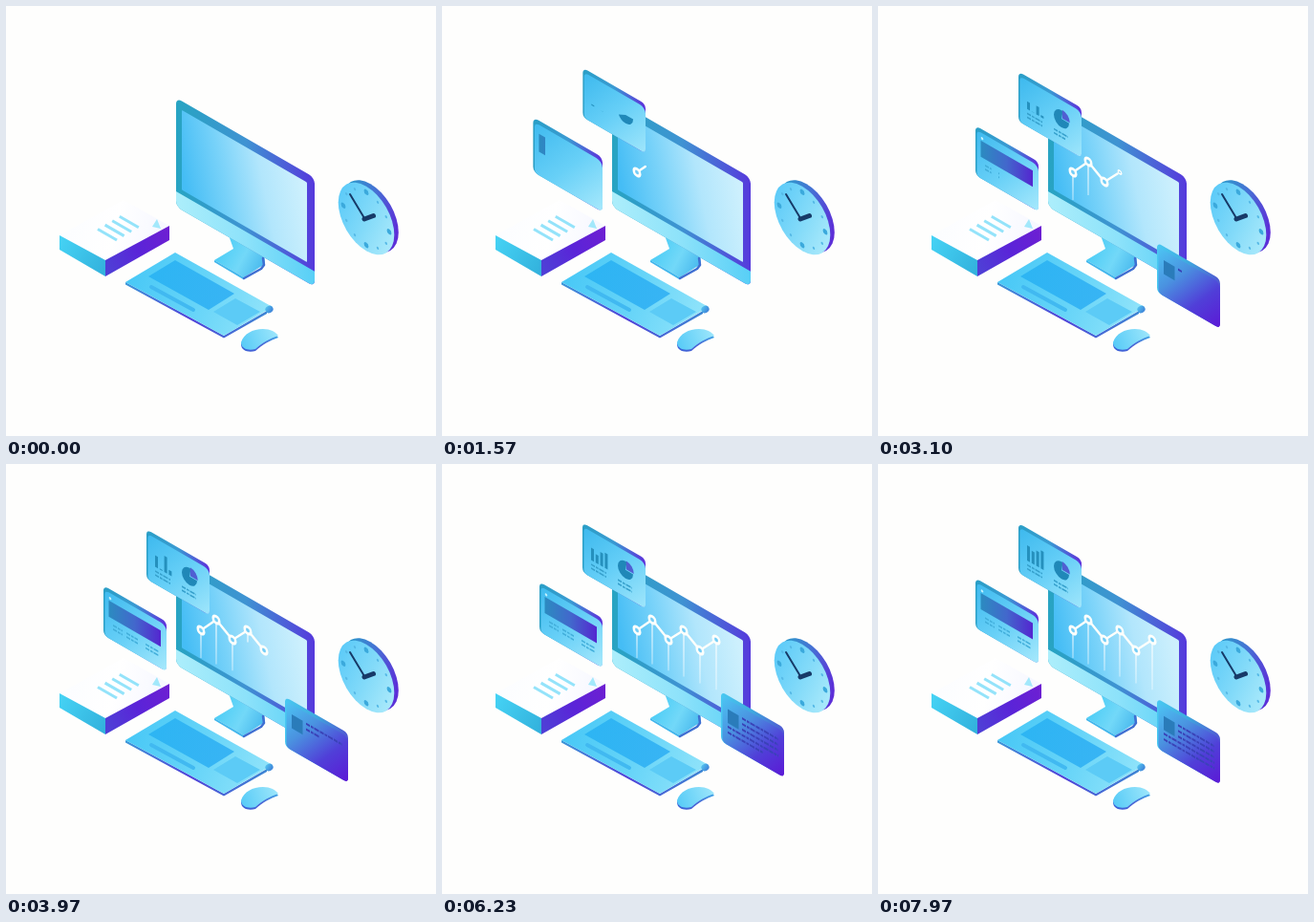
Write an HTML page with a canvas that moves like this. It is 450 px wide and 450 px high and loops after 8000 ms.

```html
<!DOCTYPE html>
<html lang="en">
<head>
<meta charset="utf-8">
<title>Isometric workspace</title>
<style>
  html, body { margin: 0; width: 100%; height: 100%; overflow: hidden; background: #fefefd; }
  canvas { display: block; width: 450px; height: 450px; }
</style>
</head>
<body>
<canvas id="stage"></canvas>
<script>
const LOOP = 8000, SLOPE = 0.577, CARD_W = 66, CARD_H = 52;
const canvas = document.getElementById('stage');
const ctx = canvas.getContext('2d');
const ratio = window.devicePixelRatio || 1;
canvas.width = canvas.height = 450 * ratio;

const clamp = v => Math.max(0, Math.min(1, v));
const progress = (t, start, length) => clamp((t - start) / length);
const ease = p => (1 - Math.cos(Math.PI * p)) / 2;
const spring = p => p <= 0 ? 0 : 1 - Math.exp(-5 * p) * Math.cos(4 * Math.PI * p);

// Period shared by the floating cards; peak is the lowest point.
const float = (t, mid, amp, peak) => mid + amp * Math.cos((t - peak) / 7200 * 2 * Math.PI);

function track(t, times, values, curve = p => p) {
  if (t <= times[0]) return values[0];
  for (let i = 1; i < times.length; i++) {
    if (t < times[i]) {
      const p = (t - times[i - 1]) / (times[i] - times[i - 1]);
      return values[i - 1] + (values[i] - values[i - 1]) * curve(p);
    }
  }
  return values[values.length - 1];
}

function gradient(x0, y0, x1, y1, ...colors) {
  const g = ctx.createLinearGradient(x0, y0, x1, y1);
  colors.forEach((c, i) => g.addColorStop(i / (colors.length - 1), c));
  return g;
}

function poly(points, fill) {
  ctx.beginPath();
  points.forEach(([x, y]) => ctx.lineTo(x, y));
  ctx.closePath();
  ctx.fillStyle = fill;
  ctx.fill();
}

function line(points, color, width, cap = 'round') {
  ctx.beginPath();
  points.forEach(([x, y]) => ctx.lineTo(x, y));
  ctx.strokeStyle = color;
  ctx.lineWidth = width;
  ctx.lineCap = cap;
  ctx.lineJoin = 'round';
  ctx.stroke();
}

function box(x, y, w, h, r, fill) {
  ctx.beginPath();
  ctx.roundRect(x, y, w, h, r);
  ctx.fillStyle = fill;
  ctx.fill();
}

function disc(x, y, r, fill) {
  ctx.beginPath();
  ctx.arc(x, y, r, 0, 2 * Math.PI);
  ctx.fillStyle = fill;
  ctx.fill();
}

// Draws in the wall plane that runs down to the right.
function wall(x, y, draw, sx = 1, sy = 1) {
  ctx.save();
  ctx.transform(sx, SLOPE * sx, 0, sy, x, y);
  draw();
  ctx.restore();
}

function book() {
  poly([[56, 240], [123, 203], [171, 230], [104, 266]], gradient(70, 220, 160, 240, '#fcfdff', '#ffffff', '#f7f8ff'));
  poly([[56, 240], [104, 266], [104, 283], [56, 255]], gradient(56, 245, 104, 275, '#45d2f4', '#33b2dd'));
  poly([[104, 266], [171, 230], [171, 245], [104, 283]], gradient(104, 270, 171, 238, '#4f3fd6', '#5a24d8', '#6d1fd2'));
  for (let i = 0; i < 4; i++) {
    const x = 96 + i * 7.6, y = 233.5 - i * 4.4;
    line([[x, y], [x + 20, y + 11.5]], '#94e3fa', 3, 'butt');
  }
  poly([[153, 231], [158, 223], [162, 233]], '#a3e8fb');
}

function keyboard() {
  poly([[125, 289], [228, 345], [273, 319], [273, 322], [228, 347.5], [125, 291.5]], gradient(125, 290, 270, 330, '#3b96d8', '#5040d8', '#3d86d4'));
  poly([[125, 289], [177, 258], [279, 315], [228, 345]], gradient(130, 275, 275, 330, '#48c8f6', '#66d4f8', '#92e4fa'));
  poly([[149, 283], [177, 266], [239, 301], [212, 318]], gradient(150, 280, 238, 306, '#2db5f3', '#38b4f4'));
  line([[152, 294], [196, 318]], '#41b9f1', 4);
  poly([[217, 320], [240, 306], [266, 320], [242, 334]], '#5ccbf6');
  ctx.beginPath();
  ctx.ellipse(275.5, 317.5, 4.2, 3.6, -0.5, 0, 2 * Math.PI);
  ctx.fillStyle = gradient(271, 315, 280, 321, '#55c8f2', '#3a74d2');
  ctx.fill();
}

function mouse() {
  const shape = dy => {
    ctx.beginPath();
    ctx.moveTo(246, 352 + dy);
    ctx.bezierCurveTo(249, 343 + dy, 258, 338 + dy, 269, 338 + dy);
    ctx.bezierCurveTo(277, 338 + dy, 282, 341 + dy, 285, 345 + dy);
    ctx.bezierCurveTo(276, 348 + dy, 269, 352 + dy, 261, 359 + dy);
    ctx.bezierCurveTo(254, 361 + dy, 246, 359 + dy, 246, 352 + dy);
  };
  shape(2);
  ctx.fillStyle = gradient(246, 355, 285, 345, '#3a62d8', '#4a62d4', '#3fa6e6');
  ctx.fill();
  shape(0);
  ctx.fillStyle = gradient(248, 355, 284, 342, '#5accf7', '#9ce6fb');
  ctx.fill();
}

function stand() {
  poly([[218, 266], [238, 254], [233, 240], [270, 257], [271, 270], [249, 284]], gradient(222, 255, 270, 280, '#4ccdf6', '#72d8f8', '#42b4ec'));
  poly([[218, 266], [249, 284], [249, 286.5], [218, 268]], '#41b6ec');
  line([[249, 285], [267, 275], [270, 271], [269, 264]], '#3f6fd2', 2.5);
}

function monitor() {
  wall(178, 96, () => {
    box(0, 0, 145, 114, 6, gradient(0, 0, 145, 0, '#27a4c2', '#3f93d2', '#5639dc'));
    box(0, 98, 145, 16, [0, 0, 6, 6], gradient(0, 0, 145, 0, '#aceefb', '#8de2fa', '#58cff6'));
    box(6, 9.5, 131, 83.5, 1, gradient(6, 70, 138, 40, '#45bdf5', '#78d2f9', '#b2e6fc', '#cdf0fd'));
  });
}

function clock() {
  const R = 29.3, stretch = 1.155;
  wall(381.5, 220, () => disc(0, 0, R, gradient(-R, 0, R, 10, '#2a9fca', '#4572d4', '#5f27d8')), 1, stretch);
  wall(377, 222.5, () => {
    disc(0, 0, R, gradient(-R, -10, R, 15, '#5bcaf8', '#82daf9', '#aeebfb'));
    for (let i = 0; i < 12; i++) {
      const a = i * Math.PI / 6;
      disc(Math.cos(a) * 24, Math.sin(a) * 24, i % 3 ? 1.2 : 2.4, i % 3 ? '#56b9e6' : '#3ba9dc');
    }
  }, 1, stretch);
  line([[375, 222], [360, 197]], '#173a68', 2);
  line([[375, 223], [384.5, 219.5]], '#173a68', 5);
}

const xs = [204, 220, 237, 253, 270, 287];
const ys = [174, 163, 184, 174, 195, 184];

function chart(t) {
  const pos = track(t, [1250, 1570, 2370, 3970, 4900], [0, 0.55, 1.88, 4, 5]);
  xs.forEach((x, i) => {
    const end = 203 + (x - 204) * 0.4;
    const p = ease(progress(t, 2000 + i * 580, 800));
    if (p > 0) {
      line([[x, ys[i] + 4], [x, ys[i] + 4 + (end - ys[i] - 4) * p]],
        gradient(0, ys[i], 0, end, 'rgba(255,255,255,.9)', 'rgba(255,255,255,.45)'), 1.3, 'butt');
    }
  });
  if (t < 1250) return;

  const n = Math.floor(pos), f = pos - n;
  const path = xs.slice(0, n + 1).map((x, i) => [x, ys[i]]);
  if (f > 0) path.push([xs[n] + (xs[n + 1] - xs[n]) * f, ys[n] + (ys[n + 1] - ys[n]) * f]);
  line(path, '#fffffc', 2.4);
  xs.forEach((x, i) => {
    const r = 3.5 * clamp((pos - i) * 4 + 1);
    if (r <= 0) return;
    wall(x, ys[i], () => {
      disc(0, 0, r + 1, '#fffffc');
      disc(0, 0, r * 0.55, '#74cdf6');
    }, 1, 1.1);
  });
}

// Cards grow from a top corner: pivot is its distance along the top edge.
function card(x, y, s, pivot, face, edge, content) {
  if (s <= 0) return;
  wall(x + pivot, y + pivot * SLOPE, () => {
    ctx.translate(-pivot, 0);
    box(0, 0, CARD_W, CARD_H, 5, gradient(0, 0, CARD_W, 0, ...edge));
    box(1.5, 4, CARD_W - 1.5, CARD_H - 4, [4, 6, 4, 4], gradient(2, 4, CARD_W, CARD_H, ...face));
    ctx.translate(0, 2);
    content();
  }, s, s);
}

// Tiny unreadable captions, revealed from left to right.
function scribble(x, y, w, p, color, width = 1.7) {
  if (p <= 0) return;
  ctx.setLineDash([4, 1, 2.6, 0.9, 5, 1]);
  line([[x, y], [x + w * p, y]], color, width, 'butt');
  ctx.setLineDash([]);
}

const EDGE = ['#2a9fc6', '#3a9ad2', '#5e2edb'];
const barTimes = [1500, 2370, 3970, 5270, 6230, 7970];
const barHeights = [
  [1, 5, 12, 10, 13, 16],
  [0, 0, 1, 5, 9, 13],
  [0, 3, 17, 16, 14, 16],
  [0, 0, 5, 12, 16, 19]
];

function statsCard(t) {
  const y = float(t, 64.6, 4.2, 3400);
  const s = spring((t - 650) / 1000);
  card(147, y, s, CARD_W, ['#3db9ee', '#66cff7', '#a0e6fb'], EDGE, () => {
    if (t >= 1500) {
      barHeights.forEach((h, i) => {
        const height = track(t, barTimes, h, ease);
        ctx.fillStyle = '#2590bd';
        ctx.fillRect(9 + i * 4.8, 32 - height, 3, height);
      });
    }
    const text = '#359fcb';
    scribble(9, 36.5, 16, progress(t, 1800, 500), text);
    scribble(9, 40.5, 16, progress(t, 1850, 500), text);
    scribble(37, 36.5, 15, progress(t, 2500, 500), text);
    scribble(37, 40.5, 15, progress(t, 2700, 500), text);

    const sweep = track(t, [1250, 1570, 2370], [0, 0.43, 0.78]) * 2 * Math.PI;
    ctx.save();
    ctx.translate(45, 21.5);
    ctx.scale(1, 1.12);
    const slice = (a, b, color) => {
      ctx.beginPath();
      ctx.moveTo(0, 0);
      ctx.arc(0, 0, 8, a, b);
      ctx.fillStyle = color;
      ctx.fill();
    };
    if (sweep > 0) slice(0, sweep, '#2088b8');
    const wedge = ease(progress(t, 2350, 700));
    if (wedge > 0) {
      ctx.translate(0.8, -0.8);
      slice(-Math.PI / 2, -Math.PI / 2 + wedge * Math.PI / 2, '#505fd2');
    }
    ctx.restore();
  });
}

function bankCard(t) {
  const y = float(t, 123.4, 4, 4400);
  const s = spring((t - 1240) / 1000);
  card(102, y, s, CARD_W, ['#3fbaef', '#68d0f7', '#a8e9fc'], EDGE, () => {
    const w = 54.5 * ease(progress(t, 1270, 1400));
    if (w > 0) box(5.5, 10.5, w, 17, 0, gradient(5, 0, 60, 0, '#2b8cc0', '#4268cc', '#5426d0'));
    if (t > 2500) disc(7, 7.5, 1.3, '#c4f1fd');
    [[10, 10], [24, 12], [44, 14]].forEach(([x, length], i) => {
      const p = progress(t, 2700 + i * 350, 600);
      scribble(x, 34, length, p, '#42aeda');
      scribble(x, 38, length, p, '#42aeda');
    });
  });
}

function profileCard(t) {
  const y = float(t, 243.4, 5.8, 2200);
  const s = spring((t - 1700) / 1000);
  const face = ['#4cc4f3', '#4a92e0', '#503fd8', '#5c18d6'];
  card(292, y, s, 0, face, ['#48c9f2', '#3fa8de', '#4f55d2'], () => {
    ctx.save();
    ctx.globalAlpha = ease(progress(t, 2050, 700));
    box(7, 12.5, 11.5, 14.5, 0, '#2a7cba');
    ctx.restore();
    for (let i = 0; i < 5; i++) {
      const x = i < 3 ? 22 : 7;
      scribble(x, 13.5 + i * 5.8, 60 - x, progress(t, 3000 + i * 650, 900), '#3a42b8', 2.2);
    }
  });
}

function draw(t) {
  ctx.setTransform(ratio, 0, 0, ratio, 0, 0);
  ctx.fillStyle = '#fefefd';
  ctx.fillRect(0, 0, 450, 450);
  stand();
  monitor();
  chart(t);
  clock();
  bankCard(t);
  book();
  keyboard();
  mouse();
  statsCard(t);
  profileCard(t);
}

const began = performance.now();
function tick() {
  draw((performance.now() - began) % LOOP);
  requestAnimationFrame(tick);
}
tick();
</script>
</body>
</html>
```
